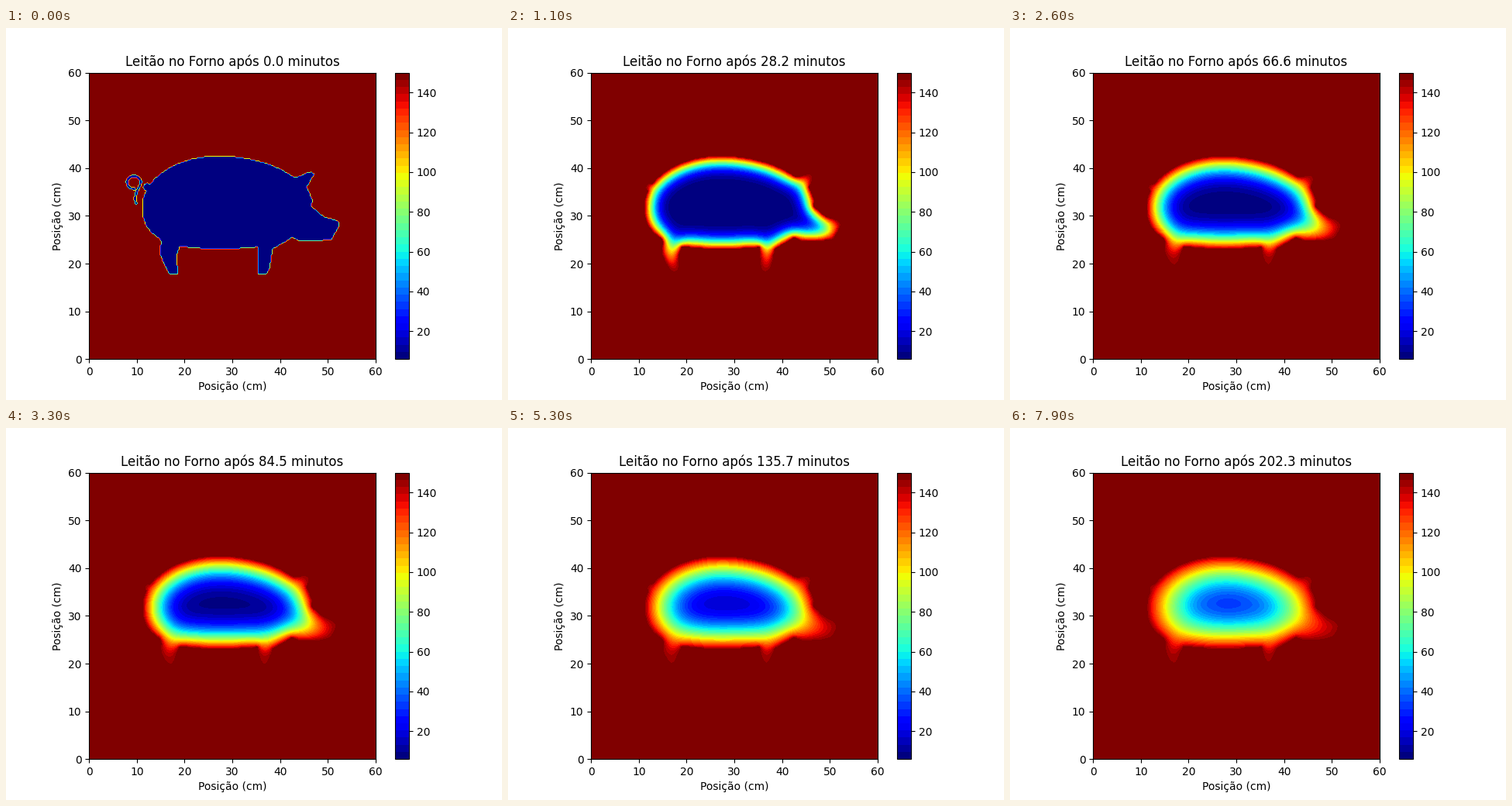
A matplotlib script that plays this animation: 640x480 px, repeating every 8000 ms.

```python
import numpy as np
import matplotlib.pyplot as plt
from matplotlib.animation import FuncAnimation
from matplotlib.cm import ScalarMappable
from matplotlib.colors import Normalize
from matplotlib.path import Path

FRAMES, INTERVAL = 80, 100
MINUTES = 2.5602            # simulated minutes per frame
COLD, HOT, BANDS = 6, 150, 40
GRID, SIZE = 250, 60        # cells per side, oven width in cm
STEPS, RATE = 15, 0.235     # solver steps per frame, alpha * dt / dx^2

# Key points in cm
HEAD = [(42, 38.4), (43.6, 38.2), (45.3, 39), (46.6, 39.3), (47.3, 38.8),
        (45.7, 36), (46.8, 33.5), (46.7, 32), (49.2, 29.9), (52.2, 29),
        (52.5, 28), (50.8, 24.9), (44, 24.6), (40, 27)]
HIND_LEG = [(14.2, 26), (15, 24.5), (14.7, 22), (16.6, 18), (17.2, 17.6),
            (18.6, 17.7), (18.5, 22), (19.3, 24.2), (22, 25)]
FORE_LEG = [(35.4, 25), (35.4, 17.6), (37.2, 17.6), (37.9, 19),
            (38.5, 23), (42, 25), (40, 27)]


def torso(X, Y):
    """Superellipse, blunter below and longer towards the head."""
    dx, dy = X - 27, Y - 32
    a = np.where(dx < 0, 15.9, 19.5)
    b = np.where(dy > 0, 10.6, 8.95)
    p = np.where(dy > 0, 2, 2.6)
    return np.abs(dx / a) ** p + np.abs(dy / b) ** p < 1


def polygon(points, X, Y):
    cells = np.column_stack([X.ravel(), Y.ravel()])
    return Path(points).contains_points(cells).reshape(X.shape)


def tail(X, Y):
    """A curl that ends in a hanging tip."""
    turn = np.radians(np.linspace(-85, -400, 60))
    drop = np.linspace(0, 1, 20)
    x = np.append(9.4 + 1.4 * np.cos(turn), 10.5 - 0.8 * np.sin(2.2 * drop))
    y = np.append(37 + 1.3 * np.sin(turn), 36.1 - 3.5 * drop)
    gap = np.hypot(X[..., None] - x, Y[..., None] - y).min(axis=-1)
    return gap < 0.33


def bake(mask):
    """Heat equation in half precision, the oven air held at HOT."""
    u = np.where(mask, COLD, HOT).astype(np.float32)
    gain = RATE * mask[1:-1, 1:-1].astype(np.float32)
    fields = [u.copy()]
    for _ in range(FRAMES - 1):
        for _ in range(STEPS):
            core = u[1:-1, 1:-1]
            lap = (u[2:, 1:-1] + u[:-2, 1:-1] + u[1:-1, 2:] + u[1:-1, :-2]
                   - 4 * core)
            u[1:-1, 1:-1] = (core + gain * lap).astype(np.float16)
        fields.append(np.clip(u, COLD, HOT))
    return fields


axis = np.linspace(0, SIZE, GRID)
X, Y = np.meshgrid(axis[(axis > 6.5) & (axis < 54)],
                   axis[(axis > 16.5) & (axis < 44)])
piglet = torso(X, Y) | tail(X, Y) | (np.hypot(X - 12.2, Y - 36) < 0.9)
for part in (HEAD, HIND_LEG, FORE_LEG):
    piglet |= polygon(part, X, Y)
fields = bake(piglet)

jet = plt.get_cmap("jet", BANDS)
norm = Normalize(COLD, HOT)
levels = np.linspace(COLD, HOT, BANDS + 1)

fig, ax = plt.subplots(figsize=(6.4, 4.8), dpi=100)
ax.set(xlim=(0, SIZE), ylim=(0, SIZE), aspect="equal", facecolor=jet(1.0),
       xlabel="Posição (cm)", ylabel="Posição (cm)")
fig.colorbar(ScalarMappable(norm, jet), ax=ax)
title = ax.set_title("")
drawn = []


def update(k):
    while drawn:
        drawn.pop().remove()
    drawn.append(ax.contourf(X, Y, fields[k], levels, cmap=jet, norm=norm))
    title.set_text(f"Leitão no Forno após {k * MINUTES:.1f} minutos")
    return drawn + [title]


anim = FuncAnimation(fig, update, frames=FRAMES, interval=INTERVAL,
                     init_func=lambda: [], repeat=True)
plt.show()
```
